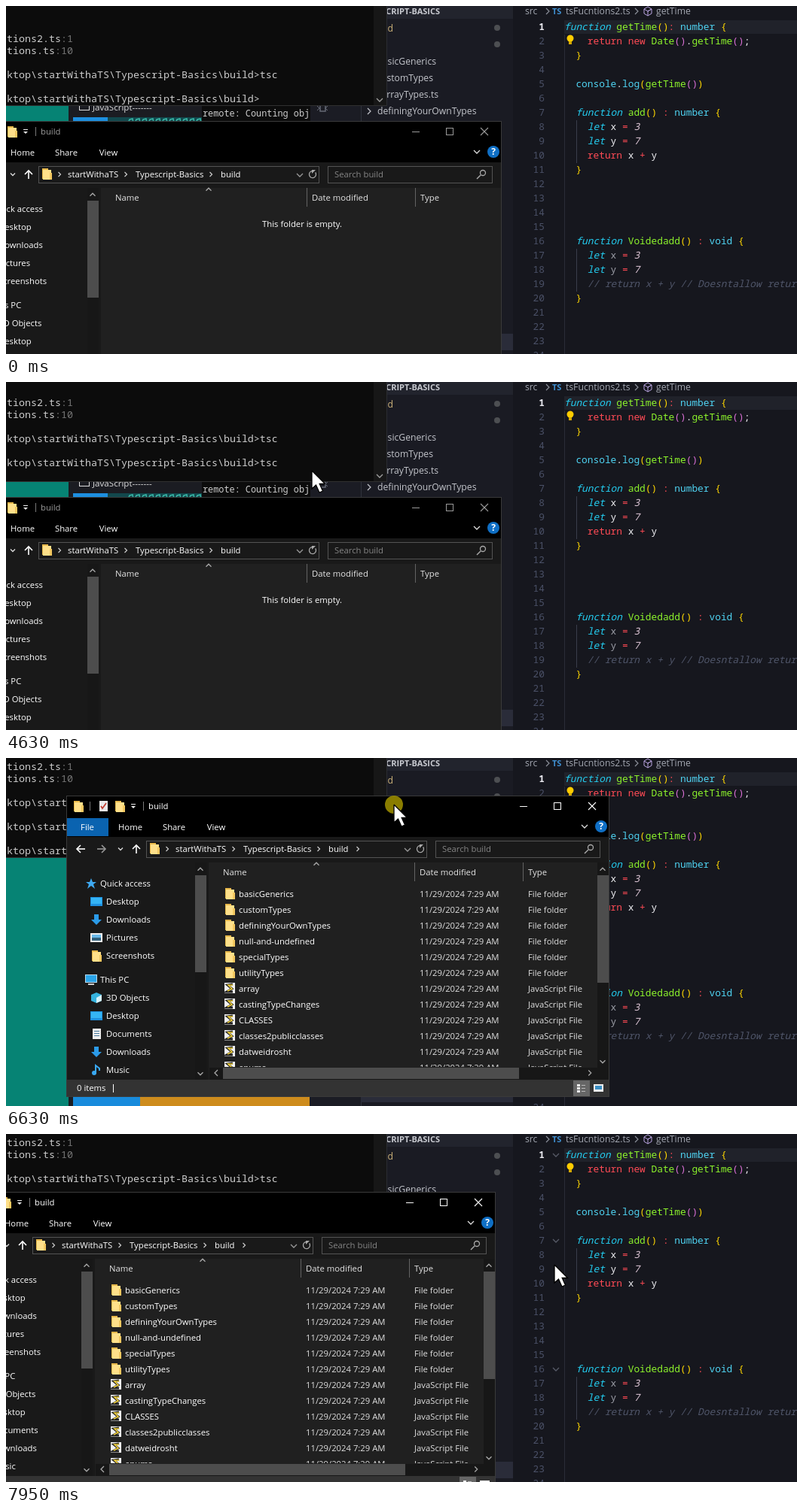
Write an HTML page with a canvas that moves like this. It is 1050 px wide and 463 px high and loops after 8000 ms.

```html
<!DOCTYPE html>
<html lang="en">
<head>
<meta charset="utf-8">
<title>Compiling TypeScript</title>
<style>
  html, body { margin: 0; width: 100%; height: 100%; overflow: hidden; background: #16171e; }
  canvas { display: block; }
</style>
</head>
<body>
<canvas id="stage" width="1050" height="463"></canvas>
<script>
const ctx = document.getElementById('stage').getContext('2d');
const LOOP = 8000;
const ui = (size = 11.3, style = '') => `${style} ${size}px "Open Sans", sans-serif`;
const mono = (size, style = '') => `${style} ${size}px "Noto Sans Mono", monospace`;

function rect(x, y, w, h, color) {
  ctx.fillStyle = color;
  ctx.fillRect(x, y, w, h);
}
function frame(x, y, w, h, color) {
  ctx.strokeStyle = color;
  ctx.lineWidth = 1;
  ctx.strokeRect(x + .5, y + .5, w - 1, h - 1);
}
function disc(x, y, r, color) {
  ctx.fillStyle = color;
  ctx.beginPath();
  ctx.arc(x, y, r, 0, 7);
  ctx.fill();
}
function text(str, x, y, color = '#fff', font = ui(), align = 'left') {
  ctx.font = font;
  ctx.fillStyle = color;
  ctx.textAlign = align;
  ctx.fillText(str, x, y + 4);
}
function path(points, x, y) {
  ctx.beginPath();
  for (let i = 0; i < points.length; i += 2) ctx.lineTo(x + points[i], y + points[i + 1]);
}
function line(points, x, y, color, width = 1) {
  path(points, x, y);
  ctx.strokeStyle = color;
  ctx.lineWidth = width;
  ctx.stroke();
}
function poly(points, x, y, color) {
  path(points, x, y);
  ctx.fillStyle = color;
  ctx.fill();
}
const right = (x, y, c = '#aaa', s = 3) => line([-s / 2, -s, s / 2, 0, -s / 2, s], x, y, c, 1.2);
const down = (x, y, c = '#aaa', s = 3.5) => line([-s, -s / 2, 0, s / 2, s, -s / 2], x, y, c, 1.3);
const up = (x, y, c = '#aaa', s = 3.5) => line([-s, s / 2, 0, -s / 2, s, s / 2], x, y, c, 1.3);

// Tracks hold rows of [time, x, y].
const windowTrack = [
  [5560, -63, 153], [6190, -34, 140], [6340, 28, 91], [6410, 51, 78], [6550, 87, 60],
  [6690, 72, 39], [6830, 54, 55], [7040, 7, 85], [7110, -52, 94], [7460, -71, 77]
];
const cursorTrack = [
  [250, 762, 383], [1020, 423, 90], [1230, 405, 120], [1510, 406, 119], [1720, 407, 121],
  [2070, 408, 118], [4520, 408, 118], [4590, 406, 118], [4870, 367, 136], [5080, 367, 143],
  [5290, 367, 165], [5560, 367, 165], [6190, 398, 152], [6340, 468, 102], [6410, 495, 88],
  [6550, 522, 72], [6690, 507, 52], [6830, 491, 70], [7040, 437, 97], [7110, 382, 106],
  [7460, 362, 89], [7600, 362, 89], [7880, 678, 150], [7950, 728, 174]
];
function sample(track, t) {
  const i = track.findIndex(row => row[0] > t);
  if (i < 1) return (i ? track[track.length - 1] : track[0]).slice(1);
  const a = track[i - 1], b = track[i], k = (t - a[0]) / (b[0] - a[0]);
  return [1, 2].map(n => Math.round(a[n] + (b[n] - a[n]) * k));
}

// ---------- code editor ----------
const code = {
  1: 'function getTime(): number {', 2: '    return new Date().getTime();', 3: '  }',
  5: '  console.log(getTime())', 7: '  function add() : number {', 8: '    let x = 3',
  9: '    let y = 7', 10: '    return x + y', 11: '  }', 16: '  function Voidedadd() : void {',
  17: '    let x = 3', 18: '    let y = 7', 19: '    // return x + y // Doesntallow return', 20: '  }'
};
const brackets = ['#ffd700', '#da70d6', '#179fff'];
const lineY = n => 9 + 19 * n;

function drawCode() {
  let depth = 0;
  for (const n in code) {
    for (const m of code[n].matchAll(/\/\/.*|\w+|[^\s\w]/g)) {
      const word = m[0], next = code[n][m.index + word.length];
      let color = '#f0f0f4', style = '';
      if (word.startsWith('//')) [color, style] = ['#50566a', 'italic'];
      else if (/^(function|let)$/.test(word)) [color, style] = ['#24cdf0', 'italic'];
      else if (/^(number|void|console|log)$/.test(word)) color = '#4fd3f2';
      else if (/^(return|new|[=+:])$/.test(word)) color = '#ff4b55';
      else if (/^\d$/.test(word)) [color, style] = ['#e0c8d8', 'italic'];
      else if (/[({]/.test(word)) color = brackets[depth++ % 3];
      else if (/[)}]/.test(word)) color = brackets[--depth % 3];
      else if (next === '(') color = '#8df32c';
      else if (n > 16 && /\w/.test(word)) color = '#9b9da6';
      text(word, 741 + m.index * 7.7, lineY(+n), color, mono(12.83, style));
    }
  }
}
function drawEditor(showFolds) {
  rect(673, 0, 377, 463, '#16171e');
  rect(741, 19, 309, 18, '#20222a');
  text('src', 689, 7, '#a4a8b2', ui(12.2));
  right(719, 7, '#8b8f99', 4);
  text('TS', 725, 7, '#3f8fd0', ui(11, 'bold'));
  text('tsFucntions2.ts', 743, 7, '#a4a8b2', ui(12.2));
  right(837, 7, '#8b8f99', 4);
  line([0, -6, 5, -3, 5, 3, 0, 6, -5, 3, -5, -3, 0, -6], 852, 7, '#b9a4e0');
  line([-5, -3, 0, 0, 5, -3, 0, 0, 0, 6], 852, 7, '#b9a4e0');
  text('getTime', 863, 7, '#a4a8b2', ui(12.2));
  rect(741, 38, 1, 425, '#2a2c37');
  for (const first of [8, 17]) rect(757, lineY(first) - 9, 1, 57, '#3a3d4b');
  for (let n = 1; n < 25; n++)
    text(n, 715, lineY(n), n > 1 ? '#4a5066' : '#e8e8ee', mono(12.83, n > 1 ? '' : 'bold'), 'right');
  drawCode();
  disc(749, 43, 4.5, '#ffcc00');
  rect(747, 47, 4, 4, '#d5a900');
  if (showFolds) for (const n of [1, 7, 16]) down(730, lineY(n), '#575b68', 4);
}

// ---------- sidebar and desktop ----------
function drawBackground() {
  rect(0, 0, 471, 463, '#068374');
  rect(83, 133, 321, 330, '#1b1c22');
  frame(97, 130, 14, 9, '#ddd');
  text('JavaScript-------', 115, 135, '#ddd', ui(11.6));
  rect(89, 148, 46, 315, '#1d8fe0');
  rect(135, 148, 125, 10, '#12484d');
  for (let x = 162; x < 258; x += 9) line([0, 8, 2, 3, 6, 2, 7, 8], x, 148, '#39b9a8', 1.5);
  rect(89, 440, 89, 23, '#188bdc');
  rect(178, 440, 225, 23, '#ce8c1d');
  rect(260, 133, 144, 20, '#0c0c0c');
  ctx.save();
  ctx.beginPath();
  ctx.rect(260, 133, 143, 20);
  ctx.clip();
  text('remote: Counting objects', 261, 143, '#ccc', mono(11.85));
  ctx.restore();
  rect(404, 133, 67, 330, '#1b1c24');
  ctx.strokeStyle = '#666a75';
  ctx.lineWidth = 1.5;
  ctx.strokeRect(417, 131, 7, 9);
  line([-7, -3, -4, 0, -7, 3], 420, 136, '#666a75');
  line([7, -3, 4, 0, 7, 3], 420, 136, '#666a75');

  rect(471, 0, 202, 463, '#1a1b23');
  rect(471, 0, 202, 17, '#22242d');
  rect(471, 133, 1, 330, '#30323c');
  rect(471, 436, 202, 22, '#2a2c39');
  text('TYPESCRIPT-BASICS', 576, 7, '#c8cad0', ui(11, 'bold'), 'right');
  text('build', 514, 30, '#cdb37a', ui(12.2), 'right');
  for (const y of [29, 51]) disc(652, y, 4, '#4d4f52');
  text('basicGenerics', 571, 74, '#c3c5cb', ui(12.2), 'right');
  text('customTypes', 567, 96, '#c3c5cb', ui(12.2), 'right');
  text('arrayTypes.ts', 574, 118, '#c3c5cb', ui(12.2), 'right');
  right(482, 140, '#c3c5cb', 4);
  text('definingYourOwnTypes', 493, 140, '#c3c5cb', ui(12.2));
}

// ---------- console ----------
function drawConsole(t) {
  const prompt = 'ktop\\startWithaTS\\Typescript-Basics\\build>';
  const shift = t < 4020 ? 0 : t < 4770 ? 16 : 32;
  const typed = 'tsc'.slice(0, [2430, 2760, 2960].filter(at => t >= at).length);
  const put = (str, x, y, color = '#ccc') => text(str, x, y - shift, color, mono(13.33));
  rect(0, 0, 505, 133, '#0c0c0c');
  rect(488, 0, 17, 133, '#171717');
  rect(0, 132, 505, 1, '#303030');
  rect(505, 0, 1, 133, '#2b2c31');
  down(496, 125, '#a0a0a0', 4);
  put('tions2.ts', 1, 44);
  put(':1', 73, 44, '#767676');
  put('tions.ts', 1, 60);
  put(':10', 65, 60, '#767676');
  put(prompt + 'tsc', 1, 92);
  put(prompt + typed, 1, 124);
  if (t >= 4770) put(prompt, 1, 156);
  const blink = t >= 1500 && t < 4020 && Math.floor((t - 1500) / 530) % 2 === 0;
  if (blink) rect(337 + typed.length * 8, 128, 8, 3, '#f2f2f2');
  if (t >= 4770 && t < 5460) rect(337, 128, 8, 3, '#f2f2f2');
}

// ---------- file explorer ----------
const folders = ['basicGenerics', 'customTypes', 'definingYourOwnTypes', 'null-and-undefined', 'specialTypes', 'utilityTypes'];
const files = ['array', 'castingTypeChanges', 'CLASSES', 'classes2publicclasses', 'datweidrosht', 'enums'];
const places = [
  ['star', 'Quick access', 117], ['screen', 'Desktop', 141], ['arrow', 'Downloads', 165],
  ['picture', 'Pictures', 189], ['folder', 'Screenshots', 213], ['pc', 'This PC', 245],
  ['cube', '3D Objects', 269], ['screen', 'Desktop', 293], ['page', 'Documents', 317],
  ['arrow', 'Downloads', 341], ['note', 'Music', 365]
];
const icons = {
  folder(x, y) {
    rect(x - 6, y - 7, 8, 14, '#e8b84a');
    rect(x - 5, y - 5, 11, 13, '#ffe08a');
    rect(x + 4, y - 1, 3, 9, '#f3c860');
  },
  script(x, y) {
    rect(x - 7, y - 7, 14, 14, '#f2f2f2');
    line([4, -5, -3, -4, 3, 1, -4, 5, 4, 5], x, y, '#222', 3);
    line([4, -4, -2, -4, 3, 1, -3, 4], x, y, '#f0cf3a', 1.6);
  },
  star(x, y) { poly([0, -7, 2, -2, 7, -2, 3, 1, 5, 7, 0, 3, -5, 7, -3, 1, -7, -2, -2, -2], x, y, '#3fa9f0'); },
  screen(x, y) {
    rect(x - 8, y - 6, 16, 12, '#1e90e0');
    rect(x - 7, y - 5, 14, 8, '#35b4f5');
  },
  arrow(x, y) { poly([-3, -7, 3, -7, 3, 0, 7, 0, 0, 7, -7, 0, -3, 0], x, y, '#2b9be8'); },
  picture(x, y) {
    rect(x - 8, y - 6, 16, 12, '#eee');
    rect(x - 6, y - 4, 12, 4, '#69b9ea');
    rect(x - 6, y, 12, 4, '#33617c');
  },
  pc(x, y) {
    rect(x - 8, y - 7, 16, 11, '#b8d9ec');
    rect(x - 7, y - 6, 14, 9, '#2aa4e8');
    rect(x - 4, y + 5, 8, 2, '#ccc');
  },
  cube(x, y) {
    poly([0, -7, 7, -4, 7, 4, 0, 7, -7, 4, -7, -4], x, y, '#36b3de');
    poly([0, 0, 7, -4, 7, 4, 0, 7], x, y, '#d8f2fa');
  },
  page(x, y) {
    rect(x - 5, y - 7, 11, 14, '#eee');
    for (const dy of [-4, -1, 2]) rect(x - 3, y + dy, 7, 1, '#4a7ca0');
  },
  note(x, y) {
    line([-1, 5, -1, -6, 4, -2, 4, 1], x, y, '#39a8f2', 2);
    disc(x - 3, y + 4, 3, '#39a8f2');
  }
};

function drawTitleBar(active) {
  const tint = active ? '#fff' : '#9a9a9a';
  rect(0, 0, 721, 55, '#000');
  icons.folder(16, 14);
  for (const x of [31, 102]) rect(x, 8, 1, 12, '#777');
  rect(44, 7, 11, 14, '#e8e8e8');
  line([-3, 0, -1, 3, 4, -4], 49, 14, '#c0392b', 1.6);
  icons.folder(71, 14);
  rect(86, 11, 6, 1, '#eee');
  poly([-3, 0, 3, 0, 0, 3], 89, 14, '#eee');
  text('build', 109, 14, tint);
  rect(602, 14, 10, 1, tint);
  frame(647, 9, 10, 10, tint);
  line([-5, -5, 5, 5], 698, 14, tint, 1.1);
  line([-5, 5, 5, -5], 698, 14, tint, 1.1);
  rect(0, 30, 56, 24, '#0a63b0');
  for (const [label, x] of [['File', 28], ['Home', 85], ['Share', 143], ['View', 199]])
    text(label, x, 42, '#fff', ui(), 'center');
  down(688, 41, '#ddd', 4);
  disc(710, 41, 8, '#0f6fc5');
  text('?', 710, 41, '#fff', ui(12, 'bold'), 'center');
}
function drawAddressBar(active) {
  rect(0, 55, 721, 34, '#191919');
  line([5, -5, 0, 0, 5, 5], 14, 71, '#fff', 1.6);
  line([0, 0, 11, 0], 14, 71, '#fff', 1.6);
  line([-5, -5, 0, 0, -5, 5], 52, 71, '#999', 1.6);
  line([0, 0, -11, 0], 52, 71, '#999', 1.6);
  down(72, 71, '#ddd', 3);
  line([-5, 0, 0, -5, 5, 0], 93, 71, '#fff', 1.6);
  line([0, -5, 0, 6], 93, 71, '#fff', 1.6);
  frame(106, 60, 373, 23, '#535353');
  frame(490, 60, 219, 23, '#535353');
  icons.folder(117, 70);
  for (const x of active ? [134, 222, 335, 387] : [134, 222, 335]) right(x, 71, '#ccc');
  text('startWithaTS', 145, 71);
  text('Typescript-Basics', 235, 71);
  text('build', 348, 71);
  down(453, 72, '#999', 4);
  ctx.strokeStyle = '#aaa';
  ctx.lineWidth = 1.3;
  ctx.beginPath();
  ctx.arc(470, 71, 4.5, -.6, 4.6);
  ctx.stroke();
  poly([0, -3, 5, -3, 0, 2], 469, 68, '#aaa');
  text('Search build', 499, 71, '#858585');
  ctx.beginPath();
  ctx.arc(696, 69, 3.5, 0, 7);
  ctx.stroke();
  line([-2, 2, -7, 7], 695, 70, '#aaa', 1.5);
}
function drawPlaces() {
  rect(0, 89, 189, 289, '#191919');
  for (const [icon, label, y] of places) {
    const top = icon === 'star' || icon === 'pc';
    icons[icon](top ? 33 : 40, y);
    text(label, top ? 45 : 53, y);
  }
  rect(171, 89, 15, 289, '#171717');
  rect(171, 106, 15, 129, '#4d4d4d');
  up(178, 98);
  down(178, 370);
}
function drawListing() {
  ctx.save();
  ctx.beginPath();
  ctx.rect(190, 110, 515, 251);
  ctx.clip();
  [...folders, ...files].forEach((name, i) => {
    const y = 131 + 21 * i, isFolder = i < folders.length;
    icons[isFolder ? 'folder' : 'script'](217, y - 1);
    text(name, 229, y);
    text('11/29/2024 7:29 AM', 469, y, '#dedede');
    text(isFolder ? 'File folder' : 'JavaScript File', 613, y, '#dedede');
  });
  ctx.restore();
  rect(705, 89, 15, 273, '#171717');
  rect(705, 106, 15, 143, '#4d4d4d');
  up(712, 98);
  down(712, 354);
  rect(190, 362, 530, 16, '#171717');
  rect(208, 362, 393, 15, '#4d4d4d');
  line([2, -4, -2, 0, 2, 4], 199, 369, '#aaa', 1.3);
  right(695, 369, '#aaa', 3.5);
}
function drawExplorer([x, y], t) {
  const active = t >= 5460;
  ctx.save();
  ctx.translate(x, y);
  rect(0, 0, 721, 401, '#202020');
  drawTitleBar(active);
  drawAddressBar(active);
  drawPlaces();
  up(332, 91);
  text('Name', 208, 102, '#e4e4e4');
  text('Date modified', 469, 102, '#e4e4e4');
  text('Type', 613, 102, '#e4e4e4');
  for (const sep of [462, 606]) rect(sep, 89, 1, 25, '#636363');
  if (t >= 5600) drawListing();
  else text('This folder is empty.', 456, 137, '#fff', ui(), 'center');
  rect(0, 378, 721, 23, '#333');
  text('0 items', 14, 389);
  rect(62, 384, 1, 11, '#fff');
  rect(673, 379, 22, 21, '#666');
  for (const dy of [384, 388, 392]) {
    rect(678, dy, 4, 3, '#eee');
    rect(684, dy + 1, 5, 1, '#bbb');
  }
  rect(700, 384, 13, 10, '#eee');
  rect(702, 386, 9, 5, '#3b8fc4');
  frame(0, 0, 721, 401, '#3a3a3a');
  ctx.restore();
}

// ---------- pointer ----------
function drawCursor([x, y], pressed) {
  if (pressed) disc(x, y, 12, 'rgba(172, 156, 0, .8)');
  const arrow = [0, 0, 0, 24, 5.5, 19, 10, 29, 14.5, 27, 10.2, 17.5, 17.5, 17.5, 0, 0];
  poly(arrow, x, y, '#fff');
  line(arrow, x, y, '#000', 1.3);
}

function render(t) {
  const stepped = Math.floor((t - 40) / 70) * 70 + 40;
  const cursor = sample(cursorTrack, stepped);
  const pressed = (t >= 1500 && t < 1700) || (t >= 5320 && t < 7530);
  drawBackground();
  drawEditor(t >= 260 && cursor[0] > 700 && cursor[0] < 741);
  drawConsole(t);
  drawExplorer(sample(windowTrack, stepped), t);
  if (t >= 260) drawCursor(cursor, pressed);
}

const start = performance.now();
function tick() {
  render((performance.now() - start) % LOOP);
  requestAnimationFrame(tick);
}
tick();
</script>
</body>
</html>
```
